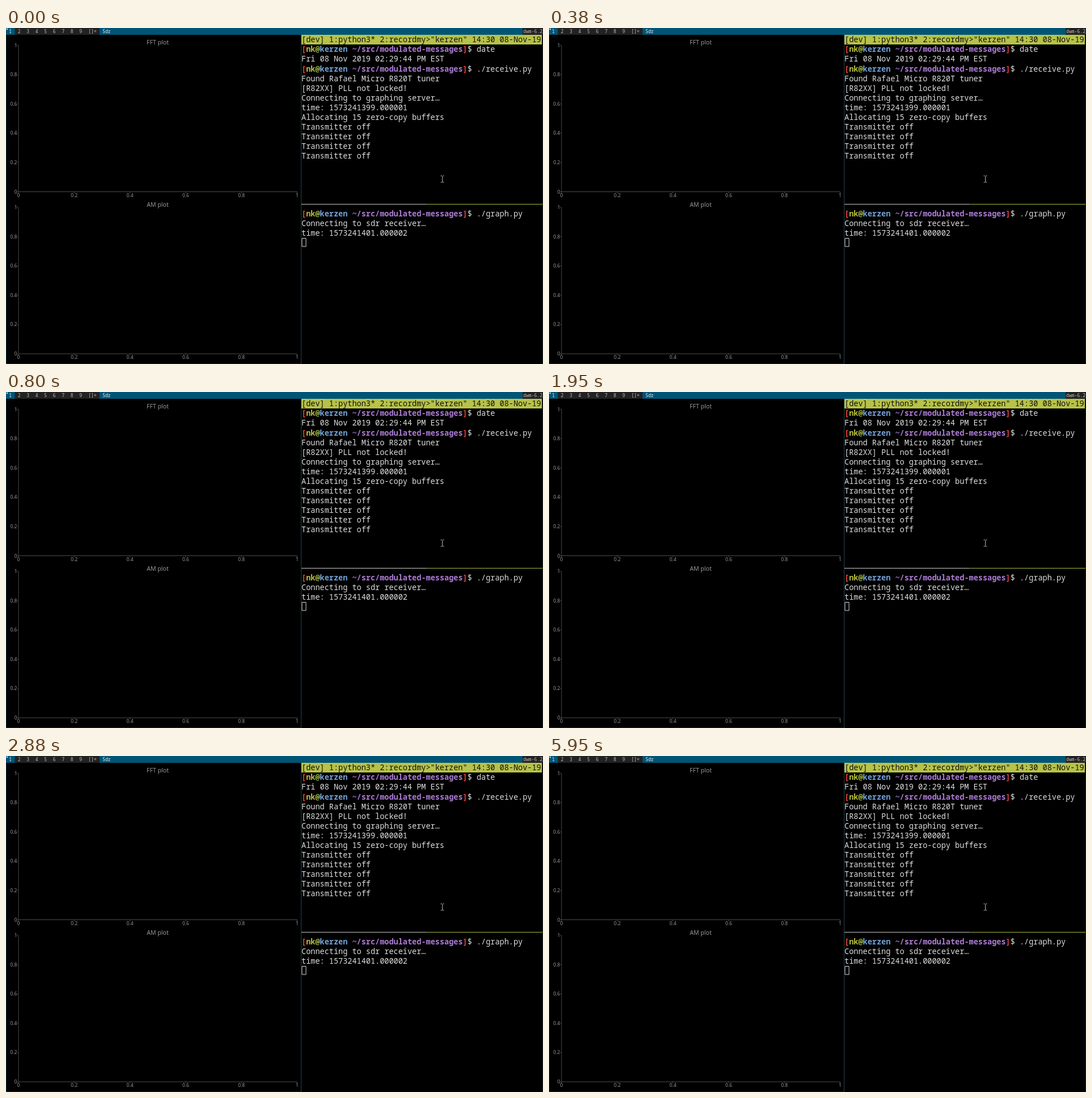
Recreate the animation shown at these times as an HTML page. Size 947 by 592 pixels, loop 8000 ms.

```html
<!DOCTYPE html>
<html lang="en">
<head>
<meta charset="utf-8">
<title>Receiver session</title>
<style>
  html, body { margin: 0; width: 100%; height: 100%; overflow: hidden; background: #000; }
  svg { display: block; width: 947px; height: 592px; }
  text { white-space: pre; }
  .term { font: 13.56px "Noto Sans Mono", monospace; fill: #dedede; }
  .bar { font: 8.15px "Noto Sans Mono", monospace; fill: #bbb; }
  .plot { font: 8.5px "Noto Sans", "Open Sans", sans-serif; fill: #969696; }
  .title { font-size: 10.6px; }
  .bold { font-weight: 700; }
</style>
</head>
<body>
<svg id="stage" viewBox="0 0 947 592"></svg>
<script>
const stage = document.getElementById("stage");
const LOOP = 8000, NEW_LINE_AT = 640;

function add(tag, attrs, content = "", parent = stage) {
  const el = document.createElementNS("http://www.w3.org/2000/svg", tag);
  for (const key in attrs) el.setAttribute(key, attrs[key]);
  el.textContent = content;
  parent.append(el);
  return el;
}
const rect = (x, y, width, height, fill) => add("rect", { x, y, width, height, fill });
const path = (d, stroke) => add("path", { d, stroke, fill: "none" });
const label = (cls, x, y, s, anchor = "start") =>
  add("text", { class: cls, x, y, "text-anchor": anchor }, s);

// Window manager bar
function drawBar() {
  rect(0, 0, 947, 12, "#222");
  rect(0, 0, 15.5, 12, "#057");
  rect(165, 0, 746, 12, "#057");
  rect(1, 1, 2, 2, "#eee");
  for (let i = 1; i <= 9; i++) {
    const tag = label("bar", 7.7 + (i - 1) * 15.5, 8.8, i, "middle");
    if (i === 1) tag.style.fill = "#eee";
  }
  label("bar", 145, 8.8, "[]=");
  label("bar", 170, 8.8, "Sdr").style.fill = "#eee";
  label("bar", 912, 8.8, "dwm-6.2");
}

function drawPlot(name, top) {
  const left = 22, width = 491.5, height = 258, bottom = top + height;
  label("plot title", 267.5, top - 1.3, name, "middle");
  let d = `M${left} ${top}V${bottom}H${left + width}`;
  for (let i = 0; i <= 5; i++) {
    const x = left + width * i / 5, y = bottom - height * i / 5;
    d += `M${left} ${y}h-2.5M${x} ${bottom}v2.5`;
    label("plot", 19.5, y + 3, i / 5, "end");
    label("plot", x, bottom + 9, i / 5, "middle");
  }
  path(d, "#4b4b4b");
}

// Terminal rows: a string, or a list of [text, colour] runs
const rowY = row => 25.4 + 17.04 * row;
function print(row, line) {
  if (typeof line === "string") return label("term", 521, rowY(row), line);
  const text = label("term", 521, rowY(row), "");
  for (const [s, fill] of line)
    add("tspan", fill ? { fill, class: "bold" } : {}, s, text);
  return text;
}
const prompt = command => [
  ["[", "#ee4338"], ["nk", "#b9bd3c"], ["@", "#a9c64b"], ["kerzen", "#72a2da"],
  [" ~/src/modulated-messages", "#ad7bd5"], ["]", "#ee4338"], ["$ " + command]
];

drawBar();
drawPlot("FFT plot", 30.5);
drawPlot("AM plot", 316);

// Window borders
rect(0, 12, 0.5, 580, "#057");
rect(0, 591.5, 520, 0.5, "#057");
rect(520, 12, 1, 580, "#24404d");
rect(946.5, 12, 0.5, 580, "#444");

rect(521, 12, 424, 17, "#b7c248");
print(0, '[dev] 1:python3* 2:recordmy>"kerzen" 14:30 08-Nov-19').style.fill = "#111";
[
  prompt("date"),
  "Fri 08 Nov 2019 02:29:44 PM EST",
  prompt("./receive.py"),
  "Found Rafael Micro R820T tuner",
  "[R82XX] PLL not locked!",
  "Connecting to graphing server…",
  "time: 1573241399.000001",
  "Allocating 15 zero-copy buffers",
  ...Array(4).fill("Transmitter off")
].forEach((line, i) => print(i + 1, line));
const newLine = print(13, "Transmitter off");

// Pane divider
rect(521, 310, 220, 1, "#c9c9c9");
rect(741, 310, 205, 1, "#a9b43f");

[prompt("./graph.py"), "Connecting to sdr receiver…", "time: 1573241401.000002"]
  .forEach((line, i) => print(i + 18, line));
path("M522 370.5h7v14.5h-7z", "#d8d8d8");

// Mouse pointer
path("M766.5 260.5h2l1 1 1-1h2M769.5 261.5v10M766.5 272h2l1-1 1 1h2", "#b4b4b4");

function frame(now) {
  newLine.style.visibility = now % LOOP >= NEW_LINE_AT ? "visible" : "hidden";
  requestAnimationFrame(frame);
}
frame(0);
</script>
</body>
</html>
```
